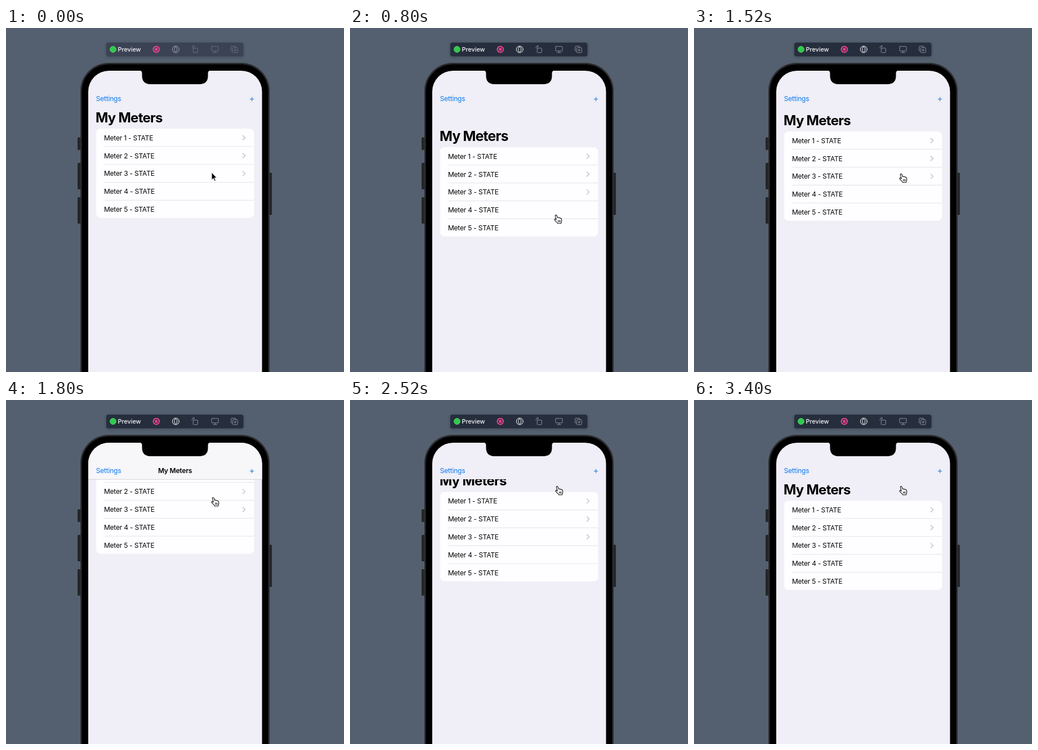
Animation of 600x612 px, one loop 3560 ms. Source, as an HTML page:

```html
<!DOCTYPE html>
<html lang="en">
<head>
<meta charset="utf-8">
<title>Meter list</title>
<style>
  html, body { margin: 0; width: 100%; height: 100%; overflow: hidden; background: #54606f; }
  svg { display: block; width: 100vw; height: 100vh; }
  text {
    font: 400 12px Inter, "Liberation Sans", sans-serif;
    font-optical-sizing: none;
    letter-spacing: -.2px;
    -webkit-font-smoothing: antialiased;
  }
  .line { fill: none; stroke-linecap: round; stroke-linejoin: round; }
  .blue { fill: #0a7af0; }
  #title { font-size: 24px; font-weight: 700; letter-spacing: -.75px; }
  #inline { font-weight: 600; }
  #tools { --bar: #3b4353; --main: #9ba0aa; --dim: #696f7c; }
  #tools.active { --bar: #272e3c; --main: #f2f3f5; --dim: #8b909b; }
  #tools text { font-size: 10.8px; font-weight: 500; letter-spacing: 0; fill: #f4f5f7; }
  .bar { fill: var(--bar); }
  .main { stroke: var(--main); }
  .dim { stroke: var(--dim); }
</style>
</head>
<body>
<svg viewBox="0 0 600 612">
  <defs>
    <clipPath id="below"><rect x="146" y="141" width="309" height="471"/></clipPath>
    <clipPath id="screen"><rect x="146" y="76" width="308.5" height="640" rx="37"/></clipPath>
    <filter id="soft" x="-20%" y="-60%" width="140%" height="220%">
      <feDropShadow dx="0" dy="1" stdDeviation="2.5" flood-color="#1c2430" flood-opacity=".3"/>
    </filter>
  </defs>
  <rect width="600" height="612" fill="#54606f"/>

  <g id="tools">
    <rect class="bar" x="178" y="26" width="243.5" height="24.5" rx="4" filter="url(#soft)"/>
    <circle cx="190" cy="38" r="5.4" fill="#2fca48" stroke="#62dc74" stroke-width=".8"/>
    <text x="198.5" y="42">Preview</text>
    <circle cx="266.8" cy="38" r="5.3" fill="none" stroke="#f0438f" stroke-width="1.9"/>
    <rect x="264.3" y="35.5" width="5" height="5" rx="1" fill="#e8408a"/>
    <g class="line main">
      <circle cx="301.3" cy="38" r="6"/>
      <rect x="299" y="33.8" width="4.6" height="8.4" rx="1.5"/>
    </g>
    <g class="line dim">
      <rect x="332.3" y="35.8" width="8" height="8" rx="1"/>
      <path d="M330.3 36V34.6Q330.3 32.4 332.5 32.4H334.3M332.8 30.8L334.5 32.4L332.8 34"/>
      <rect x="365" y="32.8" width="12" height="8" rx="1"/>
      <path d="M367.5 43.8H374.5M371 41V43.5"/>
      <path d="M401.5 41H400.8Q399.5 41 399.5 39.7V33.8Q399.5 32.4 400.8 32.4H406.7Q408 32.4 408 33.8V34.8"/>
      <rect x="402.3" y="35" width="9" height="8.8" rx="1.4"/>
      <path d="M404.8 39.4H408.8M406.8 37.4V41.4"/>
    </g>
  </g>

  <g fill="#252629">
    <rect x="127" y="194.500" width="6" height="22.500" rx="1.5"/>
    <rect x="127" y="240" width="6" height="47" rx="1.5"/>
    <rect x="127" y="301" width="6" height="47" rx="1.5"/>
    <rect x="466" y="257.500" width="6" height="75" rx="1.5"/>
  </g>
  <rect x="132" y="62" width="336" height="660" rx="50" fill="#2d2d30"/>
  <rect x="134.500" y="64.500" width="331" height="660" rx="48" fill="#000" stroke="#161618"/>

  <g clip-path="url(#screen)">
    <rect x="146" y="76" width="309" height="536" fill="#f0eef6"/>
    <g clip-path="url(#below)">
      <g id="list">
        <text id="title" x="159" y="167.800">My Meters</text>
        <rect x="160" y="179" width="280.500" height="159" rx="7.500" fill="#fefdff"/>
        <g id="rows"></g>
      </g>
    </g>
    <g id="nav">
      <rect x="146" y="76" width="309" height="65" fill="#f7f6f9"/>
      <path d="M146 141.300H455" stroke="#cccbd2" stroke-width=".8"/>
      <text id="inline" x="300" y="130" text-anchor="middle">My Meters</text>
    </g>
    <text class="blue" x="159.700" y="130.300">Settings</text>
    <path class="line" d="M433.300 126.500H439.700M436.500 123.300V129.700" stroke="#0a7af0" stroke-width="1.1"/>
  </g>
  <path d="M237 75Q241.500 76 241.500 80.500V85Q241.500 100 257 100H343Q358.500 100 358.500 85V80.500Q358.500 76 363 75Z"/>

  <g id="arrow" stroke="#fff" stroke-width="1" stroke-linejoin="round">
    <path d="M-2 -8V5.500L1.200 2.600L3.200 7.400L5.300 6.500L3.300 1.800H7.300Z"/>
  </g>
  <g id="hand" class="line" stroke="#111" stroke-width="1.100">
    <path fill="#fff" d="M-4.600 -5.700Q-5 -7.300 -3.600 -7.400Q-2.400 -7.500 -1.900 -6.200L-.6 -2.400Q.2 -3.400 1.400 -2.800Q1.900 -2.600 2.100 -2Q3 -2.800 4 -2.100Q4.400 -1.800 4.500 -1.300Q5.600 -1.600 6.200 -.5Q6.800 .8 6.700 3Q6.600 5 5.800 6.200L5.600 7.800H-.6Q-1 6.400 -2.600 4.900Q-4.200 3.400 -5.600 1.800Q-6.600 .6 -5.800 -.1Q-4.800 -.9 -3.200 .9L-2.800 1.100Z"/>
    <path d="M.6 2.200V5.200M2.400 2.200V5.200M4.200 2.200V5.200" stroke-width=".9"/>
  </g>
</svg>
<script>
const LOOP = 3560, STEP = 40, PRESS = 120, RELEASE = 2320;
const $ = id => document.getElementById(id);

const ROW = 31.85;
$("rows").innerHTML = [1, 2, 3, 4, 5].map((n, i) => {
  const y = 179 + ROW * i;
  const divider = i ? `<path d="M174.500 ${y}H440.500" stroke="#dddce2" stroke-width=".8"/>` : "";
  const chevron = n < 4
    ? `<path class="line" d="M420.500 ${y + 12.2}l4 4l-4 4" stroke="#bdbcc3" stroke-width="1.300"/>` : "";
  return `${divider}<text x="173.900" y="${y + 20.7}">Meter ${n} - STATE</text>${chevron}`;
}).join("");

// Smooth monotone curve through [time, value] points.
function track(points) {
  const last = points.length - 1;
  const slope = i => (points[i + 1][1] - points[i][1]) / (points[i + 1][0] - points[i][0]);
  const tangent = i => {
    if (i === 0 || i === last) return 0;
    const a = slope(i - 1), b = slope(i);
    return a * b > 0 ? 2 * a * b / (a + b) : 0;
  };
  return t => {
    if (t >= points[last][0]) return points[last][1];
    const i = points.findIndex((p, k) => k < last && t < points[k + 1][0]);
    const [t0, v0] = points[i], [t1, v1] = points[i + 1];
    const h = t1 - t0, u = (t - t0) / h, w = 1 - u;
    return v0 * (1 + 2 * u) * w * w + v1 * u * u * (3 - 2 * u)
      + h * u * w * (tangent(i) * w - tangent(i + 1) * u);
  };
}

const drag = track([[0, 0], [440, 0], [520, 3], [560, 8], [800, 33], [1120, 51], [1160, 51],
  [1400, 24], [1520, 5], [1680, -52], [1960, -73], [2160, -77]]);
const handX = track([[0, 367], [520, 367], [1160, 372], [1520, 371]]);
const handY = track([[0, 265], [120, 266], [440, 277], [520, 286], [560, 294], [800, 340],
  [1120, 376], [1160, 376], [1520, 267], [1680, 201], [1960, 166], [2160, 161]]);

// Follows the finger, then settles like a critically damped spring.
function scrollAt(t) {
  if (t < RELEASE) return drag(t);
  const s = 0.015 * (t - RELEASE);
  return t > 2920 ? 0 : drag(RELEASE) * (1 + s) * Math.exp(-s);
}

function draw(t) {
  const y = scrollAt(t), pressed = t >= PRESS;
  const scale = 1 + Math.max(0, y) * 0.00082;
  $("list").setAttribute("transform", `translate(0 ${y.toFixed(2)})`);
  $("title").setAttribute("transform", `translate(160 159) scale(${scale}) translate(-160 -159)`);
  $("nav").setAttribute("opacity", Math.min(1, Math.max(0, (-y - 30) / 15)));
  $("tools").classList.toggle("active", pressed);
  const place = `translate(${handX(t)} ${handY(t)})`;
  $("hand").setAttribute("transform", place);
  $("arrow").setAttribute("transform", place);
  $("hand").style.display = pressed ? "" : "none";
  $("arrow").style.display = pressed ? "none" : "";
}

const start = performance.now();
function tick() {
  const t = Math.max(0, performance.now() - start) % LOOP;
  draw(Math.floor(t / STEP) * STEP);
  requestAnimationFrame(tick);
}
tick();
</script>
</body>
</html>
```
